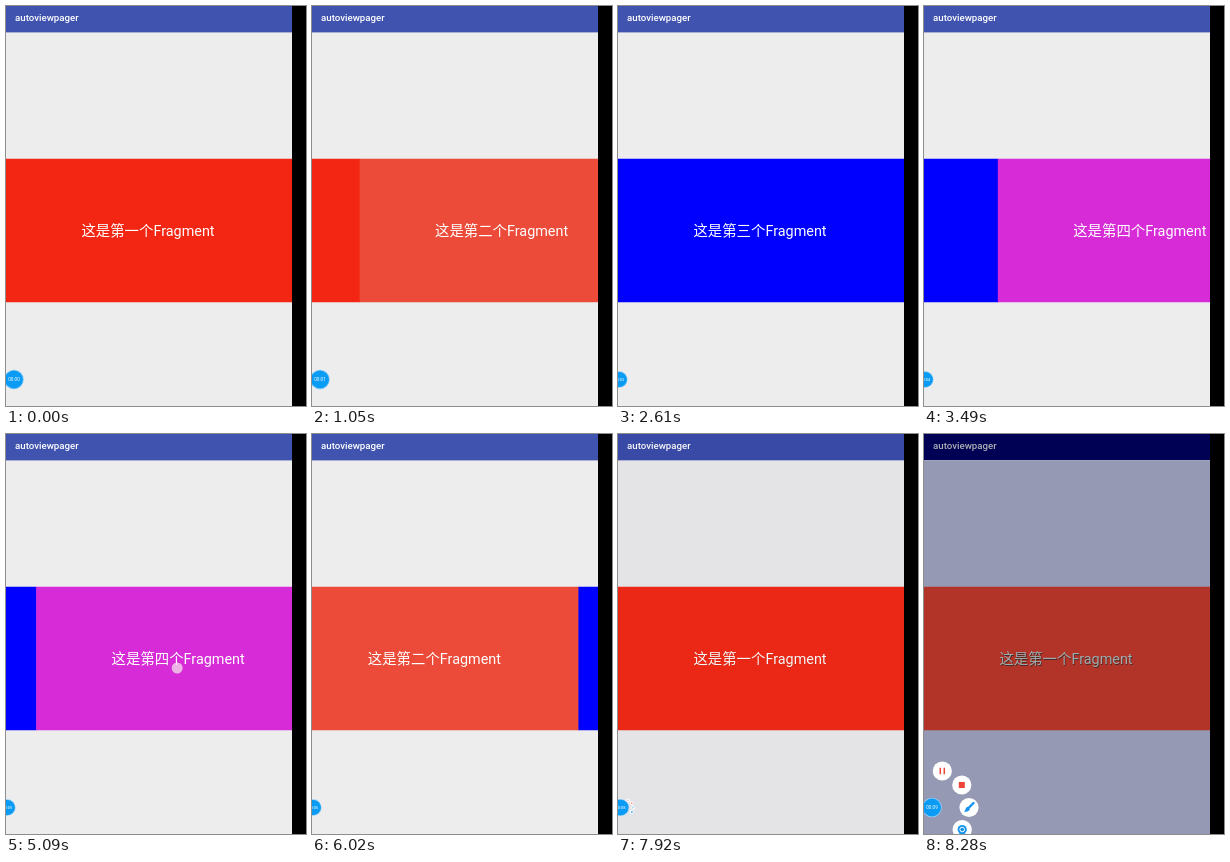
An HTML page that plays this animation: 300x400 px, repeating every 8.53 s.

```html
<!DOCTYPE html>
<html lang="zh">
<head>
<meta charset="utf-8">
<title>autoviewpager</title>
<style>
  html, body { margin: 0; width: 100%; height: 100%; overflow: hidden; background: #000; }
  svg { display: block; width: 300px; height: 400px; }
  text { font-family: Roboto, "Noto Sans CJK SC", "Noto Sans CJK", sans-serif; }
  .label { font-size: 14.4px; }
</style>
</head>
<body>
<svg viewBox="0 0 300 400">
  <defs>
    <clipPath id="screen"><rect width="286" height="400"/></clipPath>
    <clipPath id="card"><rect y="152.5" width="286" height="144"/></clipPath>
  </defs>
  <rect width="300" height="400" fill="#000"/>
  <g clip-path="url(#screen)">
    <rect id="back" width="286" height="400"/>
    <rect id="line" y="26" width="286" height="1" fill="#aab0cf"/>
    <rect id="bar" width="286" height="26"/>
    <text id="title" x="9" y="15" font-size="9.7" font-weight="500">autoviewpager</text>
    <g clip-path="url(#card)">
      <g id="pages"></g>
      <path id="glow" fill="#3f51b5"/>
    </g>
    <circle id="finger" r="5.5" fill="#f4e4ea" fill-opacity=".72"/>
    <g id="menu"></g>
    <g id="bubble">
      <circle r="9.8" fill="#8fcdf5"/>
      <circle r="9" fill="#0a9cf5"/>
      <text id="clock" y="1.7" font-size="4.6" text-anchor="middle" fill="#fff"></text>
    </g>
  </g>
</svg>
<script>
const LOOP = 8530, W = 286;
const $ = id => document.getElementById(id);
const set = (el, attrs) => { for (const k in attrs) el.setAttribute(k, attrs[k]); };
const clamp = x => Math.max(0, Math.min(1, x));
const span = (t, a, b) => clamp((t - a) / (b - a));
const lerp = (a, b, k) => a + (b - a) * k;
const easeOut = (k, n) => 1 - (1 - k) ** n;
const mix = (a, b, k) => `rgb(${a.map((v, i) => Math.round(lerp(v, b[i], k)))})`;

const pages = [
  ['一', [242, 38, 19]], ['二', [235, 75, 56]],
  ['三', [0, 0, 255]], ['四', [214, 43, 214]]
];
const dimRed = [178, 52, 40];

// Finger drags a share of the page until `up`, then the page settles by `end`.
const swipes = [
  { start: 810, up: 950, end: 1330, from: 0, to: 1, drag: .22, x: 150, y: 229 },
  { start: 2050, up: 2210, end: 2610, from: 1, to: 2, drag: .2333, x: 150, y: 227 },
  { start: 3250, up: 3410, end: 3810, from: 2, to: 3, drag: .2, x: 150, y: 229 },
  { start: 4880, up: 5200, end: 5700, from: 3, to: 2, drag: .16, x: 141, y: 234 },
  { start: 5740, up: 5860, end: 6260, from: 2, to: 1, drag: .1, x: 141, y: 232 },
  { start: 6340, up: 6550, end: 6950, from: 1, to: 0, drag: .193, x: 141, y: 232 }
];
// Pulls past the last and the first page.
const pulls = [
  { start: 4320, up: 4480, end: 4690, dir: -1, x: 150, y: 231 },
  { start: 7020, up: 7190, end: 7390, dir: 1, x: 141, y: 232 }
];

$('pages').innerHTML = pages.map(([n]) => `<g>
  <rect y="152.5" width="${W + .5}" height="144"/>
  <text class="label shade" x="142.7" y="230.7" text-anchor="middle" fill="#2c2522" opacity="0">这是第${n}个Fragment</text>
  <text class="label face" x="142" y="230" text-anchor="middle">这是第${n}个Fragment</text></g>`).join('');
const pageEls = [...$('pages').children];

const icons = [
  [18.3, 337, '<path d="M-2-3.3v6.6M2-3.3v6.6" stroke="#ee4437" stroke-width="1.5"/>'],
  [37.8, 351, '<rect x="-3" y="-3" width="6" height="6" fill="#ee4437"/>'],
  [45, 373.5, '<path d="M4.5-4.5L0 0" stroke="#1593ee" stroke-width="2.4" stroke-linecap="round"/><path d="M-1.4-.8L1 1.5Q0 4.6-5 4.3Q-3.4 3-3.4 1.3Q-3-.5-1.4-.8Z" fill="#1593ee"/>'],
  [38.2, 395.5, '<circle r="4.6" fill="#1593ee"/><circle r="2.3" fill="none" stroke="#fff"/><path d="M-3 4.5H3" stroke="#1593ee" stroke-width="1.6"/>']
];
$('menu').innerHTML = icons.map(i => `<g><circle r="9.6" fill="#fff"/>${i[2]}</g>`).join('');
const iconEls = [...$('menu').children];

function position(t) {
  let p = 0;
  for (const s of swipes) {
    if (t < s.start) break;
    const moved = t < s.up
      ? s.drag * span(t, s.start, s.up)
      : lerp(s.drag, 1, easeOut(span(t, s.up, s.end), 5));
    p = lerp(s.from, s.to, moved);
  }
  return p;
}

function drawFinger(t) {
  const s = [...swipes, ...pulls].find(s => t >= s.start && t < s.up);
  set($('finger'), { visibility: s ? 'visible' : 'hidden' });
  if (!s) return;
  const k = span(t, s.start, s.up);
  const dx = s.dir ? s.dir * 60 * k : (s.from - s.to) * s.drag * W * k;
  set($('finger'), { cx: s.x + dx, cy: s.y });
}

function drawGlow(t) {
  const s = pulls.find(s => t >= s.start && t < s.end);
  const k = s ? span(t, s.start, s.up) * (1 - span(t, s.up, s.end)) : 0;
  const edge = s && s.dir < 0 ? W : 0;
  const tip = edge + (s ? s.dir : 0) * 44 * k;
  set($('glow'), { d: `M${edge} 152Q${tip} 224.5 ${edge} 297Z`, opacity: .3 * k });
}

function drawBubble(t, open) {
  const hide = span(t, 2420, 2610) * (1 - open);
  set($('bubble'), {
    transform: `translate(${lerp(8, 1.3, hide)} 373.5) scale(${lerp(1, .84, hide)})`
  });
  $('clock').textContent = '00:0' + Math.floor((t + 300) / 940);
}

function draw(t) {
  const open = easeOut(span(t, 7880, 8280), 2);
  const dim = span(t, 7880, 8280);
  set($('back'), { fill: mix([237, 237, 237], [150, 153, 179], dim) });
  set($('bar'), { fill: mix([64, 83, 175], [0, 0, 84], dim) });
  set($('line'), { opacity: 1 - .6 * dim });
  set($('title'), { fill: mix([255, 255, 255], [174, 176, 180], dim) });

  const p = position(t);
  pageEls.forEach((el, i) => {
    const x = (i - p) * W;
    set(el, {
      transform: `translate(${x} 0)`,
      visibility: Math.abs(x) < W ? 'visible' : 'hidden'
    });
    const [box, shade, face] = el.children;
    set(box, { fill: mix(pages[i][1], i ? pages[i][1] : dimRed, dim) });
    set(shade, { opacity: dim * .8 });
    set(face, { fill: mix([255, 255, 255], [160, 170, 172], dim) });
  });

  drawGlow(t);
  drawFinger(t);
  iconEls.forEach((el, i) => set(el, {
    transform: `translate(${lerp(8, icons[i][0], open)} ${lerp(373.5, icons[i][1], open)}) scale(${open})`,
    visibility: open > 0 ? 'visible' : 'hidden'
  }));
  drawBubble(t, open);
}

function tick() {
  draw(performance.now() % LOOP);
  requestAnimationFrame(tick);
}
tick();
</script>
</body>
</html>
```
